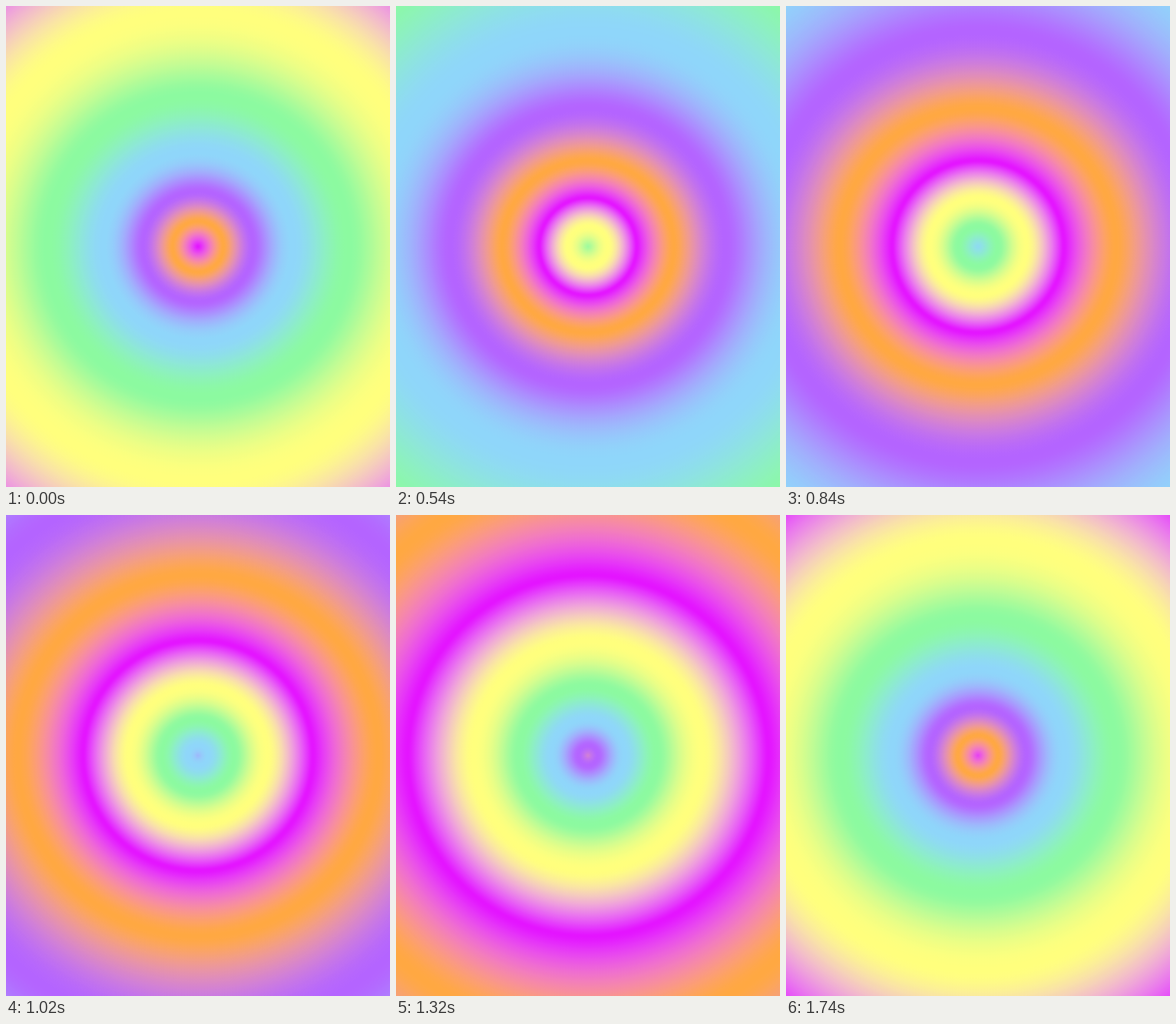
Recreate the animation shown at these times as an HTML page with a canvas. Size 500x625 px, loop 1800 ms.

```html
<!DOCTYPE html>
<html lang="en">
<head>
<meta charset="utf-8">
<title>Colour rings</title>
<style>
  html, body { margin: 0; width: 100%; height: 100%; overflow: hidden; }
  canvas { display: block; }
</style>
</head>
<body>
<canvas id="stage" width="500" height="625"></canvas>
<script>
const LOOP = 1800, STEP = 60, GAMMA = 2.2, REACH = 402, STOPS = 201;
const ctx = document.getElementById('stage').getContext('2d');

// Colours in the order they emerge from the centre
const palette = [
  [228, 20, 255],
  [255, 255, 125],
  [140, 250, 160],
  [143, 214, 250],
  [180, 100, 255],
  [255, 168, 66]
];
const count = palette.length;

// Blend neighbouring colours smoothly in linear light
function colourAt(phase) {
  const p = ((phase % count) + count) % count;
  const i = Math.floor(p), f = p - i;
  const s = f * f * (3 - 2 * f);
  const a = palette[i % count], b = palette[(i + 1) % count];
  const mix = a.map((v, k) =>
    Math.round((v ** GAMMA * (1 - s) + b[k] ** GAMMA * s) ** (1 / GAMMA)));
  return `rgb(${mix})`;
}

// Age of the ring at a radius: rings speed up as they grow
const ageAt = radius => 2.4 * Math.asinh(radius / 77);

function draw(time) {
  const phase = time / LOOP * count;
  const rings = ctx.createRadialGradient(250, 312.5, 0, 250, 312.5, REACH);
  for (let i = 0; i < STOPS; i++) {
    const x = i / (STOPS - 1);
    rings.addColorStop(x, colourAt(phase - ageAt(x * REACH)));
  }
  ctx.fillStyle = rings;
  ctx.fillRect(0, 0, 500, 625);
}

function tick() {
  const time = performance.now() % LOOP;
  draw(Math.floor(time / STEP) * STEP);
  requestAnimationFrame(tick);
}
tick();
</script>
</body>
</html>
```
